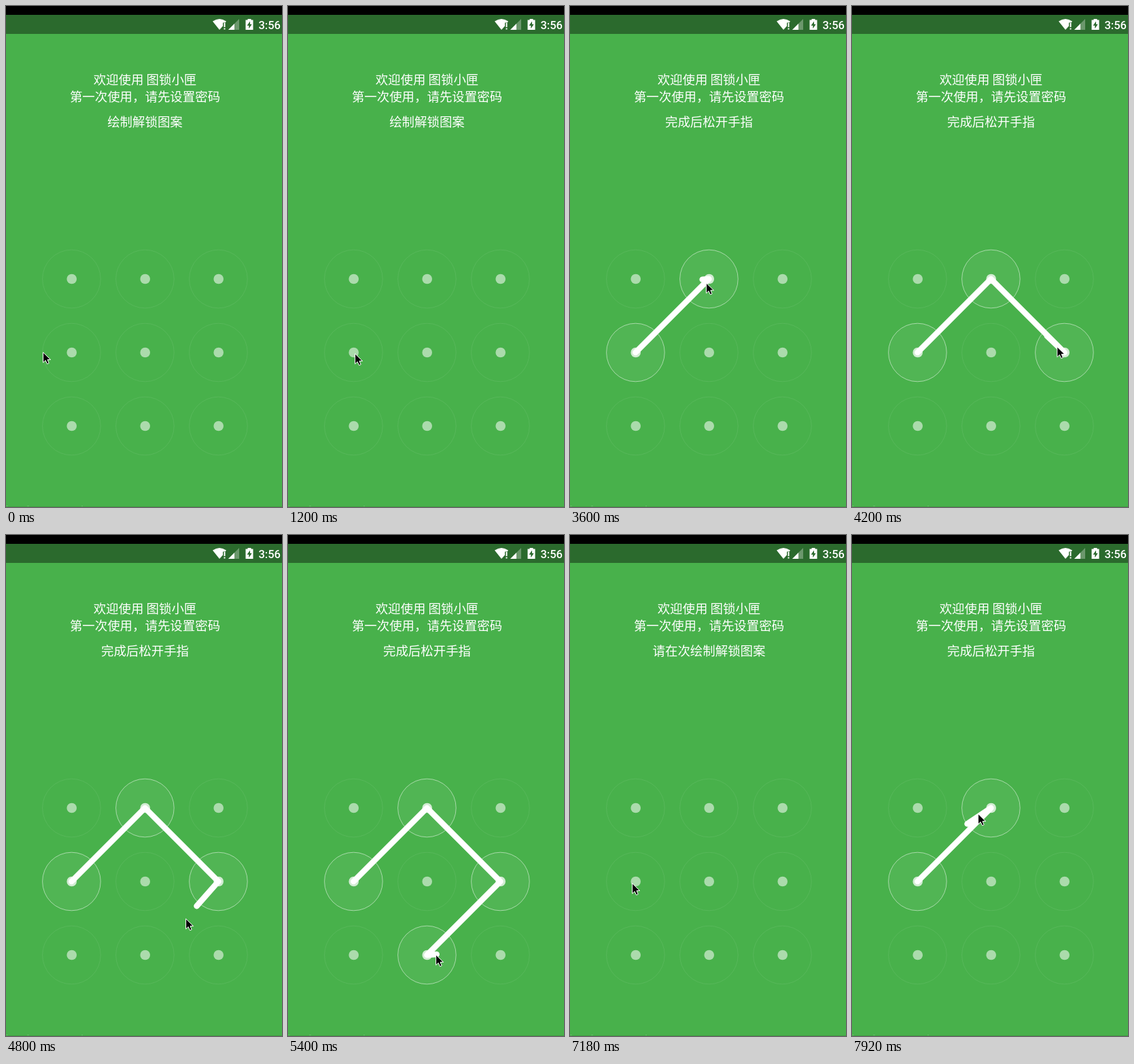
An HTML page that plays this animation: 406 by 736 pixels, repeating every 8 s.

```html
<!DOCTYPE html>
<html lang="zh-CN">
<head>
<meta charset="utf-8">
<title>图案锁</title>
<style>
  html, body { margin: 0; width: 100%; height: 100%; overflow: hidden; background: #48b14b; }
  svg { display: block; width: 406px; height: 736px; }
  .message { font: 18.45px "Noto Sans CJK SC", "Noto Sans CJK", sans-serif; fill: #fff; text-anchor: middle; }
  .clock { font: 500 16.5px Roboto, sans-serif; fill: #fff; text-anchor: end; }
  .ring { fill: none; stroke: #fff; stroke-opacity: .08; }
  .dot { fill: #fff; fill-opacity: .54; }
  .lit .ring { fill: #fff; fill-opacity: .05; stroke-opacity: .5; }
  .lit .dot { fill-opacity: .75; }
  #trail { fill: none; stroke: #fff; stroke-width: 8.5; stroke-linecap: round; stroke-linejoin: round; }
</style>
</head>
<body>
<svg viewBox="0 0 406 736">
  <rect width="406" height="736" fill="#48b14b"/>
  <rect width="406" height="41" fill="#2b6a2d"/>
  <rect width="406" height="13" fill="#000"/>
  <path d="M0 735.5H406" stroke="#2b6a2d" stroke-opacity=".3"/>
  <path d="M0 734.5h3M31 734.5h3M111 734.5h2" stroke="#fff" stroke-opacity=".15"/>

  <g fill="#fff">
    <path d="M304 22.5Q314 15.5 324 22.5L322.5 24.5H319V29.5L314 35Z"/>
    <path d="M320.5 25H322.5V31H320.5ZM320.5 32.5H322.5V34.5H320.5Z"/>
    <path d="M327 35L343 19V35Z" opacity=".3"/>
    <path d="M327 35L336 26V35Z"/>
    <path d="M352.5 20.5H355.5V19H360.5V20.5H363.5V35H352.5Z"/>
    <path d="M359 22.5L354.5 28.8H357.3V33.2L361.7 26.8H359Z" fill="#2b6a2d"/>
  </g>
  <text class="clock" x="404" y="34">3:56</text>

  <text class="message" x="204.5" y="114.5">欢迎使用 图锁小匣</text>
  <text class="message" x="204.5" y="139.5">第一次使用，请先设置密码</text>
  <text class="message" x="204.5" y="176.5" id="prompt"></text>

  <g id="grid"></g>
  <path id="trail"/>
  <path id="cursor" d="M-.4 .8v15l3.6-3.2 2.3 5.2 2.7-1.1-2.2-5.1h4.6z" fill="#000" stroke="#fff"/>
</svg>
<script>
const LOOP = 8000;
const STEP = 150;       // the picture advances about this often during a move
const LAG = 0.7;        // the trail ends this far back towards the previous pointer position
const HIT_RADIUS = 32;
const PATTERN = [3, 1, 5, 7];
const RELEASE = '完成后松开手指';

const centers = Array.from({ length: 9 }, (_, i) => [96.4 + 108 * (i % 3), 401 + 108 * Math.floor(i / 3)]);
const smooth = u => u * u * (3 - 2 * u);
const linear = u => u;

// Each move glides to a key point; bow bends its path sideways
const moves = [
  { start: 150, to: [56, 508] },
  { start: 450, end: 1200, to: [99, 510], bow: [0, -7] },
  { start: 2250, to: [98, 510] },
  { start: 2550, end: 3450, to: [192, 400], bow: [-8, 0], pressed: true, prompt: RELEASE },
  { start: 3600, end: 4350, to: [311, 510], bow: [0, -4] },
  { start: 4500, end: 5250, to: [219, 616] },
  { start: 5400, to: [218, 616] },
  { start: 5550, to: [218, 616], pressed: false, prompt: '请在次绘制解锁图案' },
  { start: 6150, end: 7180, to: [92, 511], bow: [-52, 0] },
  { start: 7480, end: 7920, to: [186, 409], bow: [0, -5], ease: linear, pressed: true, prompt: RELEASE },
];

function buildPoses() {
  const poses = [{ time: 0, pointer: [55, 508], lit: 0, prompt: '绘制解锁图案' }];
  for (const { start, end = start, to, bow = [0, 0], ease = smooth, pressed, prompt } of moves) {
    const last = poses.at(-1);
    let lit = pressed === undefined ? last.lit : Number(pressed);
    const count = Math.round((end - start) / STEP) + 1;
    for (let i = 1; i <= count; i++) {
      const u = i / count;
      const pointer = last.pointer.map((from, axis) =>
        from + (to[axis] - from) * ease(u) + bow[axis] * Math.sin(Math.PI * u));
      const next = centers[PATTERN[lit]];
      if (lit && next && Math.hypot(pointer[0] - next[0], pointer[1] - next[1]) < HIT_RADIUS) lit++;
      const time = start + (end - start) * (i - 1) / Math.max(1, count - 1);
      poses.push({ time, pointer, lit, prompt: prompt ?? last.prompt });
    }
  }
  return poses;
}
const poses = buildPoses();

const [prompt, grid, trail, cursor] = ['prompt', 'grid', 'trail', 'cursor'].map(id => document.getElementById(id));
grid.innerHTML = centers.map(([x, y]) =>
  `<g transform="translate(${x} ${y})"><circle class="ring" r="42.8"/><circle class="dot" cx=".3" r="7.3"/></g>`).join('');

function draw(time) {
  const index = poses.findLastIndex(pose => pose.time <= time + 0.5);
  const { pointer, lit, prompt: message } = poses[index];
  const previous = poses[Math.max(0, index - 1)].pointer;
  const path = PATTERN.slice(0, lit);

  prompt.textContent = message;
  centers.forEach((_, i) => grid.children[i].classList.toggle('lit', path.includes(i)));
  cursor.setAttribute('transform', `translate(${pointer})`);

  const tip = pointer.map((value, axis) => value + (previous[axis] - value) * LAG);
  trail.setAttribute('d', lit ? 'M' + [...path.map(i => centers[i]), tip].join('L') : '');
}

function tick() {
  draw(performance.now() % LOOP);
  requestAnimationFrame(tick);
}
tick();
</script>
</body>
</html>
```
